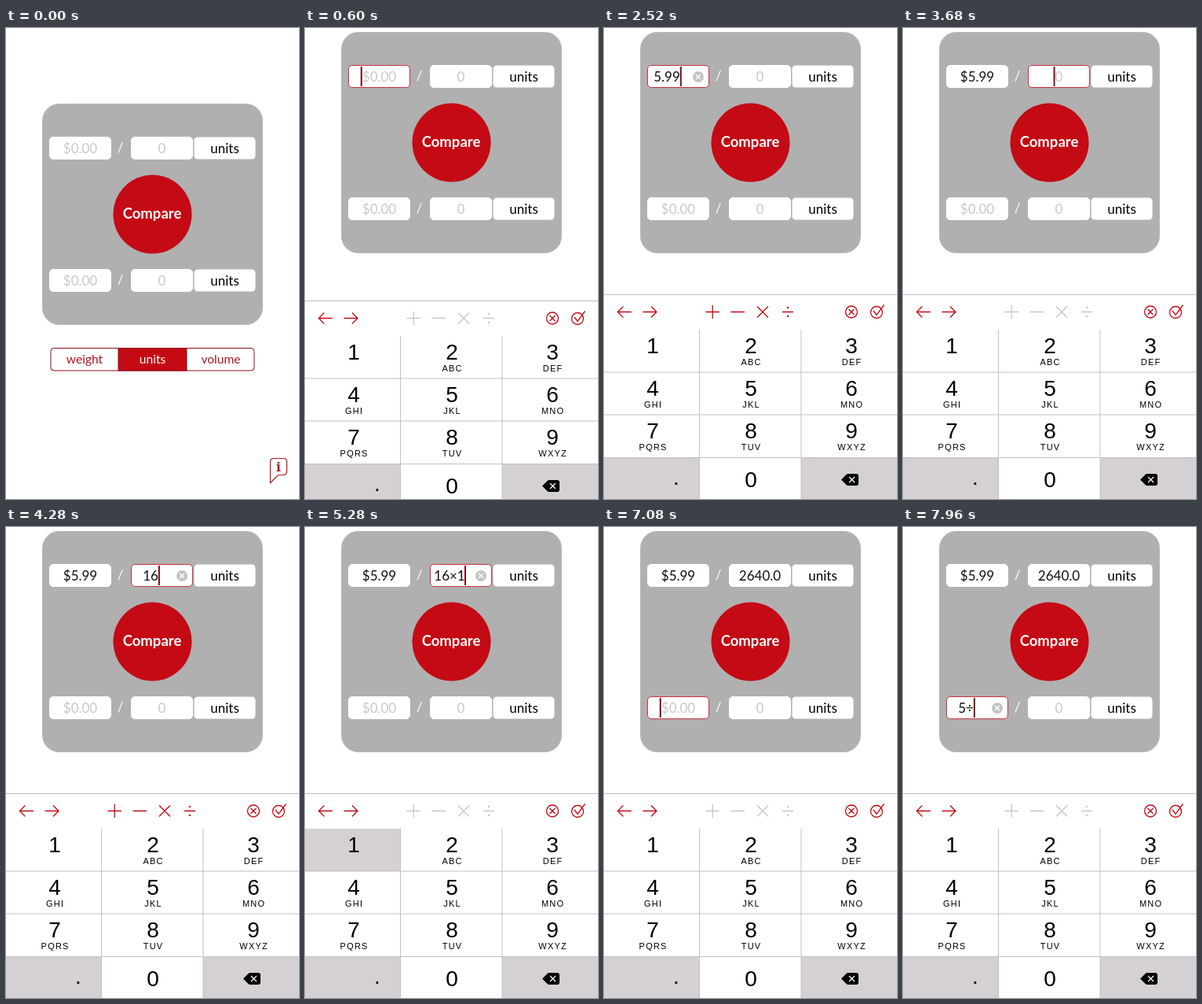
Animation of 373 by 598 pixels, one loop 8000 ms. Source, as an HTML page:

```html
<!DOCTYPE html>
<html lang="en">
<head>
<meta charset="utf-8">
<title>Unit price comparison</title>
<style>
  html, body { margin: 0; width: 100%; height: 100%; overflow: hidden; background: #fff; }
  svg { display: block; }
  text { font-family: Lato, "Open Sans", sans-serif; text-anchor: middle; white-space: pre; }
  .field { font-size: 17px; }
  .seg { font-size: 15.6px; }
  .digit { font: 28px "Liberation Sans", Arial, sans-serif; }
  .letters { font: 11px "Liberation Sans", Arial, sans-serif; letter-spacing: 1.2px; }
  .info { font: bold 17px "Noto Serif", "Liberation Serif", serif; }
  .icon { fill: none; stroke: #c40a14; stroke-width: 1.3; }
</style>
</head>
<body>
<script>
const LOOP = 8000;
const RED = '#c40a14', WINE = '#8c1019', GREY = '#d4d0d4', PALE = '#c9c9c9';

function el(parent, tag, attrs = {}, label) {
  const node = document.createElementNS('http://www.w3.org/2000/svg', tag);
  for (const key in attrs) node.setAttribute(key, attrs[key]);
  if (label !== undefined) node.textContent = label;
  return parent.appendChild(node);
}
const set = (node, attrs) => { for (const key in attrs) node.setAttribute(key, attrs[key]); };
const box = (parent, x, y, width, height, attrs) =>
  el(parent, 'rect', { x, y, width, height, ...attrs });
const write = (parent, x, y, label, attrs) => el(parent, 'text', { x, y, ...attrs }, label);

const svg = el(document.body, 'svg', { width: 373, height: 598, viewBox: '0 0 373 598' });

// Segmented control and info bubble
box(svg, 57, 406.5, 259, 28.5, { rx: 4, fill: '#fff', stroke: WINE });
box(svg, 143, 406.5, 87, 28.5, { fill: RED, stroke: WINE });
[['weight', 100, RED], ['units', 186.5, '#fff'], ['volume', 273.5, RED]].forEach(([label, x, fill]) =>
  write(svg, x, 426, label, { class: 'seg', fill: fill === RED ? '#b01420' : fill }));
el(svg, 'path', { d: 'M336.5 577.5V551q0-4.5 4.5-4.5h12q4.500 0 4.500 4.500v12q0 4.500-4.500 4.500h-6.500z',
  fill: '#fff', stroke: '#b01420', 'stroke-width': 1.2 });
write(svg, 347, 563, 'i', { class: 'info', fill: '#b01420' });

// Comparison panel
const panel = el(svg, 'g');
box(panel, 46.5, 96.5, 280, 280, { rx: 21, fill: '#b0b0b0', stroke: '#c2acac', 'stroke-width': .8 });
el(panel, 'circle', { cx: 186.5, cy: 236.5, r: 50, fill: RED });
write(panel, 186, 242, 'Compare', { fill: '#fff', 'font-size': 18.5, 'font-weight': 700 });

function makeField(x, y, hint, id) {
  const frame = box(panel, x + .5, y + .5, 78, 28, { rx: 4.5, fill: '#fff' });
  const clip = box(el(panel, 'clipPath', { id }), x + 5, y, 69, 29);
  const text = write(el(panel, 'g', { 'clip-path': `url(#${id})` }), x + 39.5, y + 20.5, '', { class: 'field' });
  const clear = el(panel, 'g');
  el(clear, 'circle', { cx: x + 65, cy: y + 15, r: 7, fill: '#c3c3c3' });
  el(clear, 'path', { d: `M${x + 62} ${y + 12}l6 6m0-6l-6 6`, stroke: '#fff', 'stroke-width': 1.4 });
  return { x, y, hint, frame, clip, text, clear };
}
const fields = [];
for (const y of [138, 306]) {
  write(panel, 145.5, y + 20, '/', { fill: '#fff', 'font-size': 17 });
  fields.push(makeField(55, y, '$0.00', 'clip' + fields.length));
  fields.push(makeField(159, y, '0', 'clip' + fields.length));
  box(panel, 239.5, y + .5, 78, 28, { rx: 4.5, fill: '#fff' });
  write(panel, 278.5, y + 20.5, 'units', { class: 'field' });
}
const caret = box(panel, 0, 0, 2, 25, { fill: '#7d0c18' });

// Keypad
const pad = el(svg, 'g');
box(pad, 0, 338, 373, 260, { fill: '#fff' });
const cols = [0, 121.5, 251, 373], rows = [383, 437, 491, 545, 600];
const centers = [62, 187, 315];
const letters = ['', 'ABC', 'DEF', 'GHI', 'JKL', 'MNO', 'PQRS', 'TUV', 'WXYZ'];
const keys = {};
function addKey(name, x, y, right, bottom, fill) {
  keys[name] = { node: box(pad, x, y, right - x, bottom - y, { fill }), fill };
}
letters.forEach((word, i) => {
  const c = i % 3, r = Math.floor(i / 3);
  addKey(i + 1, cols[c], rows[r], cols[c + 1], rows[r + 1], '#fff');
  write(pad, centers[c], rows[r] + 30, i + 1, { class: 'digit' });
  write(pad, centers[c] + .6, rows[r] + 45, word, { class: 'letters' });
});
addKey('blank', 0, 545, 60, 600, GREY);
addKey('.', 60, 545, 121.5, 600, GREY);
addKey('0', 121.5, 545, 251, 600, '#fff');
addKey('back', 251, 545, 373, 600, GREY);
write(pad, 92, 580, '.', { class: 'digit' });
write(pad, 187, 583, '0', { class: 'digit' });
el(pad, 'path', { d: 'M302 573.500l6.500-6.500q1-1 2.500-1h10q3 0 3 3v9q0 3-3 3h-10q-1.500 0-2.500-1z' });
el(pad, 'path', { d: 'M312 570l7 7m0-7l-7 7', stroke: '#fff', 'stroke-width': 1.3 });
el(pad, 'path', { d: 'M0 338.500H373M0 437H373M0 491H373M0 545.500H373M121.500 383V598M251 383V598',
  stroke: '#c2c0c2', 'stroke-width': 1 });

const icon = (d, parent = pad) => el(parent, 'path', { d, class: 'icon' });
icon('M35 360.500H17.500m7-7l-7 7l7 7M49.500 360.500H67m-7-7l7 7l-7 7');
const ring = 'a7.500 7.500 0 1 0 15 0a7.500 7.500 0 1 0-15 0';
icon(`M307.500 360.500${ring}M311.500 357l7 7m0-7l-7 7`);
icon(`M339.500 361${ring}M343 359l4 5.500l9.500-13`);
const ops = el(pad, 'g');
icon('M129.500 360.500H147M138.250 352V369M161.500 360.500H179M195 353.500l14 14m0-14l-14 14M227 360.500H241', ops);
for (const cy of [355, 366]) el(ops, 'circle', { cx: 234, cy, r: 1.2 });

// Timeline: [start, focused field, its text, operators enabled]
const edits = [
  [0, -1, '', 0], [360, 0, '', 0],
  [1240, 0, '5', 1], [1720, 0, '5.', 1], [2000, 0, '5.9', 1], [2360, 0, '5.99', 1],
  [3000, 1, '', 0], [3840, 1, '1', 1], [4120, 1, '16', 1],
  [4840, 1, '16×', 0], [5240, 1, '16×1', 0], [5520, 1, '16×16', 0], [5760, 1, '16×165', 0],
  [6440, 2, '', 0], [7160, 2, '5', 1], [7760, 2, '5÷', 0]
];
const results = ['$5.99', '2640.0'];
const presses = [
  [5, 1200, 1360], ['.', 1560, 1780], [9, 1960, 2120], [9, 2320, 2480],
  [1, 3800, 3960], [6, 4080, 4240], [1, 5200, 5360], [6, 5480, 5600], [5, 5720, 5860], [5, 7120, 7280]
];
const blinks = [[800, 1120], [3240, 3480], [6640, 6880]];

// Share of the way left for a critically damped spring
const left = (ms, scale) => {
  const x = Math.max(0, ms) / scale;
  return (1 + x) * Math.exp(-x);
};

function drawField(field, i, focus, typed) {
  const { x, y, text } = field, active = i === focus;
  const value = active ? typed : i < focus ? results[i] : '';
  const editing = active && value !== '';
  text.textContent = value || field.hint;
  const width = text.getComputedTextLength();
  const center = editing ? Math.min(x + 25, x + 45 - width / 2) : x + 39.5;
  set(text, { x: center, fill: value ? '#111' : PALE });
  set(field.clip, { width: editing ? 41 : 69 });
  set(field.frame, { stroke: active ? '#c8323c' : '#fff' });
  set(field.clear, { visibility: editing ? 'visible' : 'hidden' });
  if (active) set(caret, { x: editing ? Math.min(x + 44, center + width / 2) : center - width / 2 - 2, y: y + 2 });
}

function caretAlpha(t) {
  const span = blinks.find(([a, b]) => t >= a && t < b);
  return span ? Math.max(0, 1 - Math.min(t - span[0], span[1] - t) / 100) : 1;
}

function render(t) {
  const [, focus, typed, enabled] = edits.findLast(e => e[0] <= t);
  fields.forEach((field, i) => drawField(field, i, focus, typed));
  set(caret, { opacity: focus < 0 ? 0 : caretAlpha(t) });

  const rise = t < 360 ? 0 : Math.round(91 * (1 - left(t - 340, 30)));
  const drop = t < 360 ? 262 : Math.round(260 * left(t - 340, 49));
  set(panel, { transform: `translate(0 ${-rise})` });
  set(pad, { transform: `translate(0 ${drop})` });

  const held = presses.find(([, a, b]) => t >= a && t < b);
  for (const name in keys) {
    const { node, fill } = keys[name];
    const down = held && String(held[0]) === name;
    set(node, { fill: down ? (fill === GREY ? '#fff' : GREY) : fill });
  }
  const tint = enabled ? RED : '#c6c6c6';
  for (const part of ops.children) part.style[part.tagName === 'circle' ? 'fill' : 'stroke'] = tint;
}

const start = performance.now();
function tick() {
  render((performance.now() - start) % LOOP);
  requestAnimationFrame(tick);
}
tick();
</script>
</body>
</html>
```
